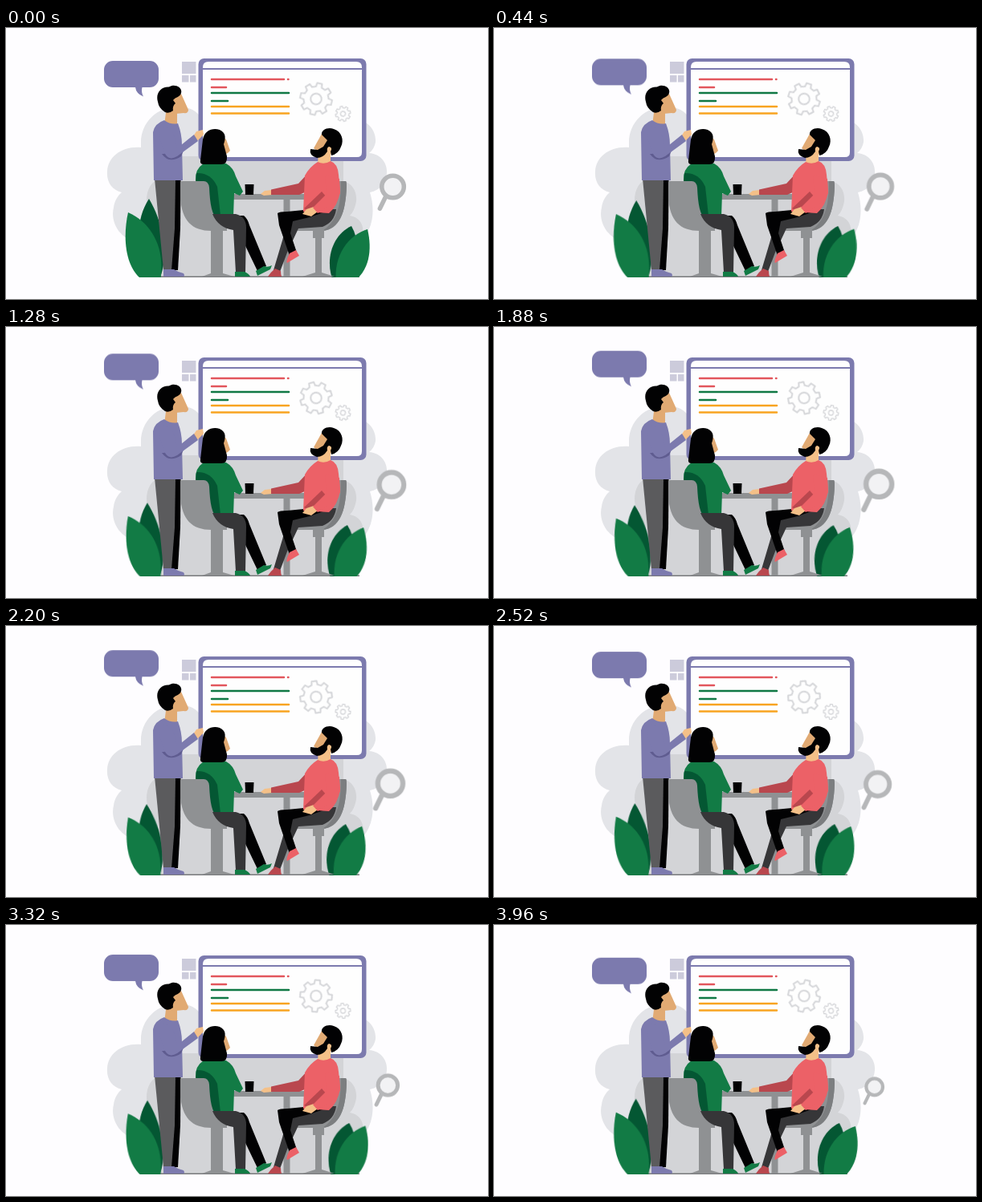
An HTML page for the animation above (4000 ms loop, 600x338 px).

```html
<!DOCTYPE html>
<html lang="en">
<head>
<meta charset="utf-8">
<title>Team meeting</title>
<style>
  html, body { margin: 0; width: 100%; height: 100%; overflow: hidden; background: #fefdff; }
  svg { display: block; width: 100%; height: 100%; }
  .purple { fill: #7c7aae; }
  .purpleDark { fill: #5f5c90; }
  .cloud { fill: #e3e4e8; }
  .cloudDark { fill: #d3d4d7; }
  .chair { fill: #8f9193; }
  .chairDark { fill: #7c7e80; }
  .pants { fill: #5b5b5d; }
  .pantsDark { fill: #363638; }
  .black { fill: #020203; }
  .skin { fill: #f4c088; }
  .skinDark { fill: #e1aa73; }
  .red { fill: #ec6167; }
  .redDark { fill: #b9474e; }
  .green { fill: #127b45; }
  .greenDark { fill: #045733; }
  .line { fill: none; stroke-width: 2.5; stroke-linecap: round; }
  .gear { fill: none; stroke: #d5d6d9; }
</style>
</head>
<body>
<svg viewBox="0 0 600 338" xmlns="http://www.w3.org/2000/svg">
  <clipPath id="aboveFloor"><rect width="600" height="310.500"/></clipPath>

  <path class="cloud" d="M168 145C167 118 188 99 212 98C232 98 240 106 246 116H430C448 112 461 126 460 142
    C459 148 456 153 452 156C466 157 475 168 474 181C473 194 466 202 453 205C459 224 458 247 445 262
    L432 310H180L160 267C139 260 130 240 134 224C135 216 139 209 144 205C132 202 125 192 126 179
    C127 160 145 147 168 149Z"/>
  <path class="cloudDark" d="M200 160H420V191C432 194 437 205 436 216Q434 228 428 234C440 236 446 246 444 256
    L432 310H184V238C172 226 172 202 184 192Z"/>

  <g fill="#cccbdb">
    <rect x="219" y="42" width="17.500" height="15"/>
    <rect x="219" y="59" width="8.500" height="8.500"/>
    <rect x="229" y="59" width="7.500" height="8.500"/>
  </g>

  <rect class="purple" x="239.500" y="38" width="209" height="128" rx="7"/>
  <path fill="#fefefe" d="M245 50V49Q245 42 252 42H436Q443 42 443 49V50ZM245 52H443V155Q443 161 437 161H251Q245 161 245 155Z"/>
  <g class="line">
    <path stroke="#e2565c" d="M256 64H346M351 64H351.500M256 74H274"/>
    <path stroke="#0f7844" d="M256 80.900H352M256 91H276"/>
    <path stroke="#f8a420" d="M256 98.100H352M256 106.500H352"/>
  </g>
  <g id="bigGear" class="gear"></g>
  <g id="smallGear" class="gear"></g>

  <path id="bubble" class="purple" d="M133 41H179A11 11 0 0 1 190 52V63A11 11 0 0 1 179 74H169.500Q168 80 171 85.500Q162 82 161 74H133A11 11 0 0 1 122 63V52A11 11 0 0 1 133 41Z"/>

  <g id="lens" stroke="#b6b7b9" stroke-width="6.500">
    <path d="M-11 15.500L-19 32" stroke-linecap="round"/>
    <circle r="16.200" fill="#f2f2f4"/>
  </g>

  <path d="M176 310.300H440" stroke="#77787b" stroke-width="1.500"/>

  <g clip-path="url(#aboveFloor)">
    <g id="leftPlant">
      <path class="greenDark" d="M178 213C161 239 161 273 180 316H190C205 282 194 240 178 213Z"/>
      <path class="green" d="M152 230C145 262 148 300 172 316H192C199 274 181 243 152 230Z"/>
    </g>
    <g id="rightPlant">
      <path class="greenDark" d="M430 247C406 258 396 290 408 318H424C439 290 441 266 430 247Z"/>
      <path class="green" d="M450 251C427 258 407 283 411 318H430C453 304 456 276 450 251Z"/>
    </g>
  </g>

  <g id="standing">
    <path class="black" d="M203 188H217.500L217 250L214 302H204Z"/>
    <path class="pants" d="M185 188H211L210 250L206 302H196Z"/>
    <path class="purple" d="M196 301H209Q215 305 221 306Q223 309 221 310H196Z"/>
    <path class="skinDark" d="M200 98L213 104V122L197 121Z"/>
    <path class="skinDark" d="M208 86L218 82L227 102Q227 107 221 106L211 107L203 100Z"/>
    <path class="black" d="M189 92C186 82 192 73 203 73.500C210 69 220 74 218 81C217 86 211 86 208 90L211 94Q207 97 208 103Q203 107 198 105Q190 100 189 92Z"/>
    <path class="purple" d="M197 115Q205 121 214 119Q219 132 219 146L220 190H184L183 130Q185 119 197 115Z"/>
    <path class="purpleDark" d="M194 157Q207 158 224 146L218 160Q203 170 194 157Z"/>
    <path class="skin" d="M231 138L237 129L245 127L246 133L240 139L235 143Z"/>
    <path class="purple" d="M197 122Q208 126 211 140L213 150L234 133L239 141L213 160Q203 166 198 157L190 133Z"/>
  </g>

  <g id="table">
    <rect class="chair" x="345.500" y="213" width="8" height="97"/>
    <path class="chair" d="M281 207H372V214H281Z"/>
    <path class="black" d="M297.500 195H308.500L308 208H298Z"/>
  </g>

  <g id="woman">
    <path class="chair" d="M255 244H270V306L284 310H244L255 306Z"/>
    <path class="skinDark" d="M267 134L274 139L279 153L276 156L266 161Z"/>
    <path class="green" d="M246 169H274Q283 174 286 185L295 204L291 209L284 206L283 236H254L236 190Q235 176 246 169Z"/>
    <path class="greenDark" d="M237 181Q255 180 263 198L267 234H253L236 194Z"/>
    <path class="black" d="M245 139C247 128 257 124 266 127C275 131 273 139 271 145L275 160Q276 170 268 170H246Q241 170 242 165Z"/>
    <path class="black" d="M281 234H296Q301 238 303 246L324 297L313 303L289 253Z"/>
    <path class="green" d="M311 303L321 297Q326 299 331 296L329 301L313 309Z"/>
    <path class="chair" d="M219 191H246Q252 191 253 199C254 220 256 233 264 240L275 247V253H256C231 253 219 240 217 212V194Q217 191 219 191Z"/>
    <path class="pantsDark" d="M257 232H286Q299 235 299 249L298 305H286L283 252Q264 249 257 232Z"/>
    <path class="green" d="M285 304H297Q303 307 304 310H285Z"/>
  </g>

  <g id="seated">
    <path class="chair" d="M402 191H423Q424 192 424 197C423 231 415 251 394 253H363V249C390 248 402 235 402 191Z"/>
    <path class="chairDark" d="M417 191H423Q424 192 424 197C423 231 415 251 394 253C411 242 417 224 417 191Z"/>
    <path class="chair" d="M382 252H396V262H393V305L409 310H369L385 305V262H382Z"/>
    <path class="skin" d="M389 150L400 142L410 150L404 158V172H388Z"/>
    <path class="skinDark" d="M393 132L383 150L390 155L400 149L403 138Z"/>
    <path class="black" d="M393 133C392 127 401 123 408 126C418 129 421 140 417 148Q414 157 405 159L404 154Q407 149 402 148Q399 149 400 154Q395 162 387 162Q377 159 379 151L388 152L395 148L400 140Z"/>
    <path class="skin" d="M331 202L322 203L317 207L321 209L332 208Z"/>
    <path class="redDark" d="M330 201.500L364 194L376 181L383 200L365 208L330 208Z"/>
    <path class="pantsDark" d="M377 226H411Q409 242 394 248L364 250L350 280L341 304L333 302L344 265L351 238Z"/>
    <path class="redDark" d="M335 300L342 303Q342 308 343 310H326Q329 305 335 300Z"/>
    <path class="black" d="M338 231Q340 229 350 229L381 226L395 230L378 236L357 241L354 256L362 280L353 284L340 246Z"/>
    <path class="red" d="M353 281L361 277L365 284L350 293Q348 291 353 281Z"/>
    <path class="red" d="M388 167Q396 171 404 166Q413 169 414 183L416 204Q413 222 402 231L370 229L372 184Q378 173 388 167Z"/>
    <path class="redDark" d="M371 225L393 204L399 211L380 230Z"/>
    <path class="skin" d="M383 223L374 226L369 232L380 235L388 229Z"/>
    <path class="red" d="M397 183L415 188L416 206Q411 219 388 231L382 224L399 207Z"/>
  </g>
</svg>

<script>
  const LOOP = 4000;
  const byId = id => document.getElementById(id);

  function drawGear(id, radius, hole, stroke) {
    const teeth = 8, points = [];
    const profile = [[-0.30, 0.78], [-0.20, 1], [0.20, 1], [0.30, 0.78]];
    for (let i = 0; i < teeth; i++) {
      for (const [turn, reach] of profile) {
        const angle = (i + turn) * 2 * Math.PI / teeth;
        const r = radius * reach;
        points.push(`${(r * Math.cos(angle)).toFixed(2)},${(r * Math.sin(angle)).toFixed(2)}`);
      }
    }
    byId(id).innerHTML = `<polygon points="${points.join(' ')}" stroke-linejoin="round"/><circle r="${hole}"/>`;
    byId(id).style.strokeWidth = stroke;
  }

  drawGear('bigGear', 20, 6.8, 2);
  drawGear('smallGear', 9.5, 3, 1.3);

  const place = (x, y, scale = 1, turn = 0) =>
    `translate(${x}px, ${y}px) rotate(${turn}deg) scale(${scale})`;
  const pivot = (x, y, turn, scale = 1) =>
    `${place(x, y, scale, turn)} translate(${-x}px, ${-y}px)`;

  // Poses spread evenly over the loop.
  const poses = {
    bubble: [place(0, 0), place(0, -12), place(0, 0)],
    lens: [place(481.5, 198, 0.85), place(479, 195.8), place(473.5, 202, 0.63)],
    leftPlant: [pivot(187, 311, 0), pivot(187, 311, -2.6, 0.905), pivot(187, 311, -1, 0.965)],
    rightPlant: [pivot(430, 345, 0), pivot(430, 345, -4.6), pivot(430, 345, 0)],
    bigGear: [place(386, 88.5, 1, 13), place(386, 88.5, 1, 58)],
    smallGear: [place(419.5, 107, 1, 31), place(419.5, 107, 1, -14)]
  };

  for (const [id, steps] of Object.entries(poses)) {
    byId(id).animate(steps.map(transform => ({ transform })), { duration: LOOP, iterations: Infinity });
  }
</script>
</body>
</html>
```
